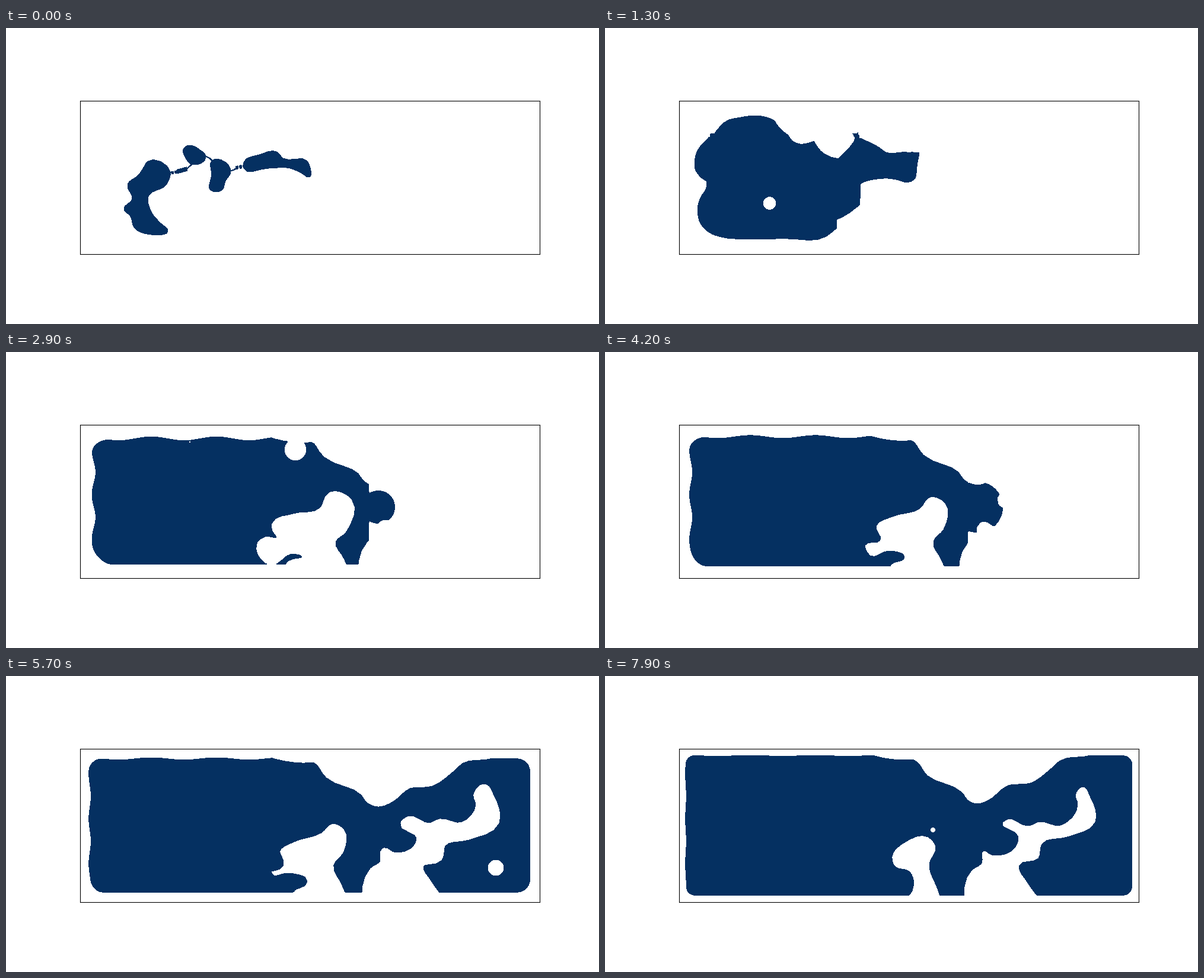
These frames come from a looping animation (1000x500 px, 8000 ms). A matplotlib script:

```python
import numpy as np
import matplotlib.pyplot as plt
from matplotlib.animation import FuncAnimation
from matplotlib.path import Path

NAVY = "#053061"
FRAMES, STEP = 80, 100
LEFT, RIGHT, TOP, BOTTOM = 125, 900, 123.33, 381.67
LAKE_T, FLOOD_T, END_T = 700, 1900, 7900

gx = np.arange(LEFT, RIGHT + 1, 2.0)
gy = np.arange(124, 383, 2.0)
X, Y = np.meshgrid(gx, gy)
grid = np.column_stack([X.ravel(), Y.ravel()])


def smooth(points, n=4):
    """Closed Hermite curve whose tangents follow the chord lengths."""
    p = np.array(points, float)
    chord = np.roll(p, -1, 0) - p
    size = np.hypot(*chord.T)[:, None]
    unit = chord / size
    tan = np.roll(unit, 1, 0) * size + unit * np.roll(size, 1, 0)
    tan /= np.hypot(*tan.T)[:, None] + 1e-9
    s = (np.arange(n) / n)[None, :, None]
    p0, p1 = p[:, None], np.roll(p, -1, 0)[:, None]
    m0, m1 = (tan * size)[:, None], (np.roll(tan, -1, 0) * size)[:, None]
    curve = ((2 * s**3 - 3 * s**2 + 1) * p0 + (s**3 - 2 * s**2 + s) * m0
             + (3 * s**2 - 2 * s**3) * p1 + (s**3 - s**2) * m1)
    return curve.reshape(-1, 2)


def blob(*points):
    """Signed distance to a smooth closed curve, negative inside."""
    c = smooth(points)
    best = np.full(X.shape, 1e9)
    for (x0, y0), (x1, y1) in zip(c, np.roll(c, -1, 0)):
        dx, dy = x1 - x0, y1 - y0
        px, py = X - x0, Y - y0
        k = np.clip((px * dx + py * dy) / (dx * dx + dy * dy + 1e-9), 0, 1)
        best = np.minimum(best, (px - k * dx)**2 + (py - k * dy)**2)
    inside = Path(np.vstack([c, c[:1]])).contains_points(grid)
    return np.where(inside.reshape(X.shape), -1, 1) * np.sqrt(best)


def disc(x, y, r):
    return np.hypot(X - x, Y - y) - r


# First wet shapes: a chain of basins, then one lake.
basin = blob((238, 226), (277, 243), (270, 265), (240, 284), (244, 309),
             (262, 331), (273, 341), (238, 348), (216, 337), (210, 318),
             (199, 306), (213, 289), (205, 264), (223, 249), (232, 236))
pond = blob((299, 205), (305, 199), (327, 206), (337, 217), (315, 231),
            (302, 218))
pocket = blob((347, 224), (376, 233), (379, 243), (370, 258), (364, 274),
              (345, 274), (347, 248))
arm = blob((401, 227), (428, 214), (456, 209), (467, 220), (508, 225),
           (512, 233), (511, 252), (500, 246), (480, 237), (442, 237),
           (401, 237))
lake = blob((157, 209), (187, 213), (208, 201), (217, 181), (208, 164),
            (232, 155), (272, 153), (295, 175), (303, 188), (350, 205),
            (390, 234), (386, 265), (420, 287), (411, 308), (380, 290),
            (356, 290), (352, 306), (371, 327), (369, 350), (300, 355),
            (240, 357), (197, 350), (167, 315), (166, 293), (181, 286),
            (186, 237), (157, 236), (153, 222))
for hole in ((268, 215, 8), (315, 266, 12), (277, 298, 18)):
    lake = np.maximum(lake, -disc(*hole))
river = np.minimum.reduce([basin, pond, pocket, arm])
lake = np.minimum(lake, arm)

# Land left dry: the valley and channel as they end, the bay at two times.
valley = blob((440, 130), (500, 142), (521, 142), (543, 168), (602, 197),
              (613, 211), (628, 216), (645, 211), (680, 185), (718, 181),
              (752, 157), (768, 143), (820, 134), (630, 60))
channel = blob((678, 242), (714, 253), (732, 246), (768, 252), (797, 216),
               (793, 201), (807, 187), (818, 203), (827, 247), (780, 272),
               (737, 284), (731, 308), (699, 320), (713, 349), (735, 385),
               (608, 385), (618, 328), (635, 316), (638, 295), (652, 302),
               (693, 287), (697, 272), (670, 248))
bay_wide = blob((548, 245), (574, 255), (571, 300), (554, 320), (568, 352),
                (580, 400), (490, 400), (482, 359), (505, 347), (480, 336),
                (447, 344), (439, 326), (464, 318), (457, 294), (484, 278),
                (531, 264))
bay_small = blob((545, 272), (558, 288), (547, 318), (563, 365), (570, 400),
                 (500, 400), (521, 350), (514, 331), (488, 321), (484, 304),
                 (505, 281))
BAY_T = 4200

# Dry pockets: x, y, radius, then the times they begin to shrink and vanish.
pockets = [(310, 152, 20, 1900, 3000), (329, 182, 11, 1900, 2800),
           (381, 199, 16, 1900, 2800), (278, 294, 5, 1900, 2500),
           (488, 165, 36, 1900, 4000), (585, 315, 72, 1900, 2800),
           (826, 324, 14, 5700, 7600), (553, 260, 4.5, 7900, 8800)]


def tank(lag):
    """Rounded box whose wavy western shores flatten as the gap closes."""
    inset, wave = 11.5 + lag, 0.8 + lag / 5
    west = X < 500
    side = wave * np.cos(2 * np.pi * (Y - 241) / 76) * west
    roof = wave * np.cos(2 * np.pi * (X - 245) / 110) * west * (Y < 250)
    r = 1.3 * inset
    qx = abs(X - 512.5) - 387.5 + inset - side + r
    qy = abs(Y - 252.5) - 129.2 + inset - roof + r
    return (np.hypot(np.maximum(qx, 0), np.maximum(qy, 0))
            + np.minimum(np.maximum(qx, qy), 0) - r)


def flood(t):
    lag = 14 * (END_T - t) / (END_T - FLOOD_T)
    u = (t - BAY_T) / (END_T - BAY_T)
    s = u * u if u > 0 else u
    bay = (1 - s) * bay_wide + s * bay_small
    edge = np.interp(t, [1900, 2800], [602, 612])
    burst = np.interp(t, [1900, 2700, 4500, 5400], [0, 25, 46, 320])
    front = np.minimum(X - edge, disc(628, 262, burst))
    wet = np.maximum.reduce([tank(lag), lag - valley, lag - channel, -bay, front])
    for x, y, r, start, stop in pockets:
        left = np.clip((stop - t) / (stop - start), 0, 1)
        if left > 0:
            wet = np.maximum(wet, -disc(x, y, r * left))
    return wet


def blend(a, b, s, reach):
    a, b = np.clip(a, -reach, reach), np.clip(b, -reach, reach)
    return (1 - s) * a + s * b


first_flood = flood(FLOOD_T)


def field(t):
    if t < LAKE_T:
        return blend(river, lake, t / LAKE_T, 60)
    if t < FLOOD_T:
        return blend(lake, first_flood, (t - LAKE_T) / (FLOOD_T - LAKE_T), 25)
    return flood(t)


fig = plt.figure(figsize=(10, 5), dpi=100, facecolor="white")
ax = fig.add_axes([LEFT / 1000, 1 - BOTTOM / 500,
                   (RIGHT - LEFT) / 1000, (BOTTOM - TOP) / 500])
ax.set_xticks([])
ax.set_yticks([])


def neck(x, y, width=0.8, dash="-"):
    ax.plot(x, y, color=NAVY, lw=width, ls=dash, antialiased=False,
            solid_capstyle="butt", dash_capstyle="butt")


dots = (0, (0.8, 0.5))
neck([279, 290], [245, 242.5], 3, dots)
neck([289, 305], [242.5, 238], 4.5)
neck([304, 309, 314], [239, 234, 230])
neck([337, 342, 348], [217, 219, 224])
neck([379, 384, 389], [241, 240, 236.5])
neck([388, 401], [236, 233.5], 3.4, dots)
ax.set_xlim(LEFT, RIGHT)
ax.set_ylim(BOTTOM, TOP)

fill = None


def draw(i):
    global fill
    if fill is not None:
        fill.remove()
    fill = ax.contourf(gx, gy, field(i * STEP), levels=[-1000, 0], colors=[NAVY])
    return []


def reset():
    return draw(0)


anim = FuncAnimation(fig, draw, frames=FRAMES, init_func=reset, interval=STEP,
                     repeat=True, repeat_delay=0, blit=False)
plt.show()
```
